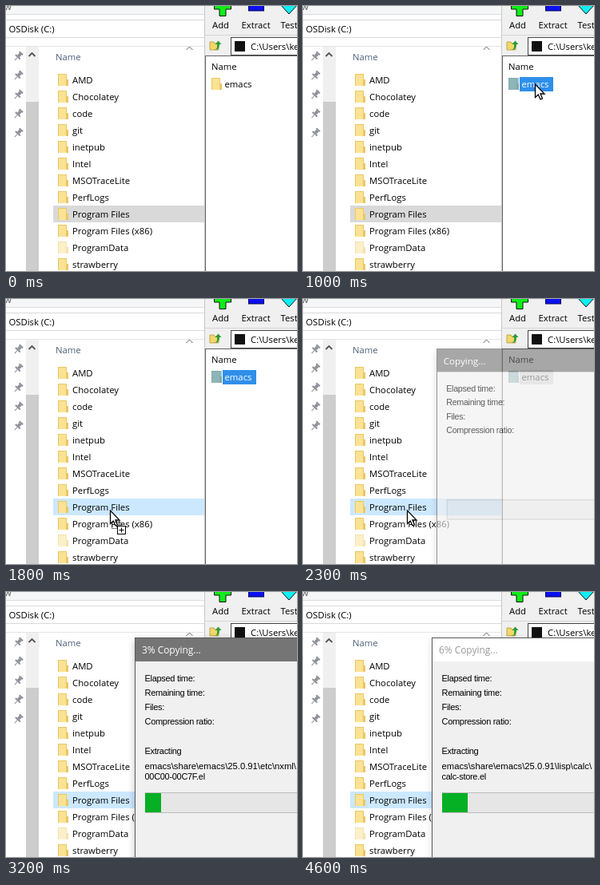
Recreate the animation shown at these times as an HTML page. Size 364 px wide and 332 px high, loop 4.7 s.

```html
<!DOCTYPE html>
<html lang="en">
<head>
<meta charset="utf-8">
<title>Drag and drop extraction</title>
<style>
html, body { margin: 0; width: 364px; height: 332px; overflow: hidden; background: #fff; }
svg { display: block; }
text { font: 11.3px "Open Sans", sans-serif; fill: #000; white-space: pre; }
.title { font-size: 11.9px; }
.label { font: 11px "Liberation Sans", Arial, sans-serif; letter-spacing: -.3px; }
.path { font: 11.25px "Liberation Sans", Arial, sans-serif; }
</style>
</head>
<body>
<svg id="stage" width="364" height="332" viewBox="0 0 364 332"></svg>
<script>
const LOOP = 4700, STEP = 100, ROW = 21.05, DROP_ROW = 8;
const folders = ['AMD', 'Chocolatey', 'code', 'git', 'inetpub', 'Intel', 'MSOTraceLite',
  'PerfLogs', 'Program Files', 'Program Files (x86)', 'ProgramData', 'strawberry'];

const rowY = i => Math.round(92.5 + ROW * i);
const rect = (x, y, w, h, fill, more = '') =>
  `<rect x="${x}" y="${y}" width="${w}" height="${h}" fill="${fill}" ${more}/>`;
const text = (x, y, s, more = '') => `<text x="${x}" y="${y}" ${more}>${s}</text>`;
const path = (d, fill, more = '') => `<path d="${d}" fill="${fill}" ${more}/>`;
const folder = (x, y, more = '') => `<g transform="translate(${x} ${y})" ${more}>
  ${path('M0-8h11v7h2v8H0z', '#eac765')}${rect(1, -7, 9, 14, '#fbe294')}</g>`;
const pin = y => `<g transform="translate(15.5 ${y}) rotate(42)" fill="#8b9097">
  ${rect(-3, -6, 6, 2, '#8b9097')}${rect(-2, -4, 4, 4, '#8b9097')}
  ${rect(-4, 0, 8, 2, '#8b9097')}${rect(-.5, 2, 1, 5, '#8b9097')}</g>`;

const explorer = `
  ${rect(0, 0, 249, 10, '#f5f6f7')}${rect(0, 10, 249, 1, '#dcdddf')}
  ${text(-2, 5, 'w', 'style="fill:#555"')}
  ${rect(-2, 17.5, 260, 22, '#fff', 'stroke="#d9d9d9"')}
  ${rect(0, 50, 249, 1, '#e5e5e5')}
  ${text(3.5, 33, 'OSDisk (C:)')}
  ${[63, 87, 111, 135, 159].map(pin).join('')}
  ${rect(25, 51, 16, 69, '#f0f0f0')}${rect(25, 120, 16, 212, '#cdcdcd')}
  ${path('M28.5 63l4-4 4 4', 'none', 'stroke="#555" stroke-width="1.8"')}
  ${text(62, 68, 'Name', 'style="fill:#4c607a"')}
  ${path('M225.500 55l4-4 4 4', 'none', 'stroke="#666"')}
  ${rect(59, 250, 190, 21, '#d9d9d9', 'id="selected"')}
  ${rect(59, 0, 190, 21, '#cce8ff', 'id="hover"')}
  ${folders.map((name, i) =>
    folder(65, rowY(i), name === 'ProgramData' ? 'opacity=".5"' : '') +
    text(83, rowY(i) + 4, name)).join('')}`;

const archive = `
  ${rect(249, 0, 115, 332, '#fff')}${rect(249, 0, 115, 63, '#f0f0f0')}
  ${rect(249, 36, 115, 1, '#d5d5d5')}
  ${path('M260.500-2h21V4h-6.500V12.500h-8V4h-6.500z', '#10ee18', 'stroke="#111"')}
  ${rect(303.5, -2, 19, 8, '#0b10f0', 'stroke="#05055c"')}
  ${path('M343-2L354 10L365-2z', '#10eef4', 'stroke="#111"')}
  ${text(258, 27.5, 'Add')}${text(294.5, 27.5, 'Extract')}${text(343.5, 27.5, 'Test')}
  ${path('M255 45h5l1 2h5v8H255z', '#f4d768', 'stroke="#a98c2c" stroke-width=".7"')}
  ${path('M260 55q5 0 4-7h-2.500l4-4.500 4 4.500H267q0 8-7 7z', '#2e9d36')}
  ${rect(281.5, 39.5, 90, 22, '#fff', 'stroke="#444"')}
  ${rect(286, 44, 13, 13, '#111')}
  ${text(306, 54.500, 'C:\\Users\\ke')}
  ${rect(249, 62, 115, 1, '#646464')}${rect(249, 62, 1, 270, '#646464')}
  ${rect(248, 0, 1, 332, '#c8c8c8')}
  ${text(257, 80, 'Name')}
  ${folder(257, 98)}
  ${rect(257, 90, 13, 15, '#3390d8', 'id="tint" opacity=".55"')}
  ${rect(271, 89, 42, 18, '#2f8fea', 'id="pick"')}
  ${text(273.5, 102, 'emacs', 'id="item"')}`;

const labels = [['Elapsed time:', 112], ['Remaining time:', 130], ['Files:', 148],
  ['Compression ratio:', 166], ['Extracting', 203, 'id="extracting"']];
const dialog = `<g id="dialog">
  <g id="shadow" filter="url(#blur)">${rect(161, 60, 300, 300, '#000')}</g>
  ${rect(161, 57, 210, 280, '#5a5a5a')}
  ${rect(162, 58, 210, 29, '#757575', 'id="bar"')}
  ${rect(162, 87, 210, 250, '#f0f0f0')}
  ${text(170, 77, '', 'id="title" class="title"')}
  ${labels.map(([s, y, more = '']) => text(173.5, y, s, `class="label" ${more}`)).join('')}
  ${text(173.5, 222, '', 'id="dir" class="path"')}
  ${text(173.5, 235, '', 'id="file" class="label"')}
  ${rect(174.5, 251.5, 200, 25, '#e6e6e6', 'stroke="#bcbcbc"')}
  ${rect(174, 252, 0, 24, '#06b025', 'id="fill"')}
</g>`;

const pointer = `<g id="cursor">
  ${path('M.5 0V16.500L4.300 13L7 19L9.500 18L7 12H12z', '#fff',
    'stroke="#000" stroke-width="1.3"')}
  <g id="copy">
    ${rect(2.5, 14.5, 11, 8, 'none', 'stroke="#000" stroke-dasharray="1 1"')}
    ${rect(9.5, 19.5, 10, 10, '#fff', 'stroke="#000"')}
    ${path('M14.500 21.500v6M11.500 24.500h6', 'none', 'stroke="#000"')}
  </g></g>`;

stage.innerHTML = `<defs><filter id="blur" x="-20%" y="-20%" width="140%" height="140%">
  <feGaussianBlur stdDeviation="5"/></filter></defs>` + explorer + archive + dialog + pointer;
const el = id => document.getElementById(id);
const set = (id, attrs) => {
  for (const name in attrs) el(id).setAttribute(name, attrs[name]);
};
const show = (id, on) => { el(id).style.display = on ? '' : 'none'; };

// Time followed by one or more values, joined linearly.
const route = [[300, 368, 214], [500, 316, 156], [600, 306, 130], [700, 297, 108], [800, 291, 98],
  [1000, 290, 98], [1200, 283, 108], [1300, 235, 165], [1400, 175, 226], [1600, 136, 262],
  [1800, 130, 265], [2400, 130, 265], [3000, 240, 340]];
const progress = [[2500, 0], [3200, 20], [4000, 32]];
const files = [[2600, 'etc\\charsets\\', 'JISX2131.map'], [2900, 'etc\\images\\', 'attach.xpm'],
  [3200, 'etc\\nxml\\', '00C00-00C7F.el'], [3500, 'lisp\\emacs-lisp\\', 'bytecomp.el'],
  [3800, 'lisp\\progmodes\\', 'cc-mode.el'], [4000, 'lisp\\textmodes\\', 'bibtex.el'],
  [4300, 'lisp\\calendar\\', 'diary-lib.el'], [4500, 'lisp\\calc\\', 'calc-store.el']];

function along(keys, t) {
  const i = keys.findIndex(k => k[0] > t);
  if (i < 0) return keys[keys.length - 1].slice(1);
  if (!i) return keys[0].slice(1);
  const a = keys[i - 1], b = keys[i], p = (t - a[0]) / (b[0] - a[0]);
  return a.slice(1).map((v, j) => v + (b[j + 1] - v) * p);
}

function drawDialog(t) {
  show('dialog', t >= 2300);
  const grow = Math.min(1, .975 + Math.max(0, t - 2300) * .000125);
  const inactive = t >= 4500;
  set('dialog', {
    opacity: t < 2400 ? .63 : t < 2500 ? .9 : 1,
    transform: `translate(401 260) scale(${grow}) translate(-401 -260)`
  });
  set('shadow', { opacity: inactive ? .15 : .25 });
  set('bar', { fill: inactive ? '#fff' : '#757575' });
  el('title').style.fill = inactive ? '#999' : '#fff';
  const percent = t < 2600 ? '' : t < 2900 ? '0% ' : t < 4300 ? '3% ' : '6% ';
  el('title').textContent = percent + 'Copying...';
  const current = files.filter(f => f[0] <= t).pop();
  show('extracting', current);
  el('dir').textContent = current ? 'emacs\\share\\emacs\\25.0.91\\' + current[1] : '';
  el('file').textContent = current ? current[2] : '';
  set('fill', { width: along(progress, t)[0] });
}

function draw(t) {
  const [x, y] = along(route, t);
  const dragging = t >= 1200 && t < 2000, dropped = t >= 2000;
  show('cursor', t >= 300 && t < 3000);
  set('cursor', { transform: `translate(${x} ${y})` });
  show('copy', dragging);

  const over = dropped ? DROP_ROW : Math.floor((y - rowY(0)) / ROW + .5);
  show('hover', dropped || dragging && x < 248);
  set('hover', { y: rowY(over) - 11 });
  show('selected', !dropped);

  const picked = t >= 900;
  show('pick', picked);
  show('tint', picked);
  set('pick', { fill: t < 2300 ? '#2f8fea' : '#d9d9d9' });
  el('item').style.fill = picked && t < 2300 ? '#fff' : '#000';
  drawDialog(t);
}

function tick() {
  draw(Math.floor(performance.now() % LOOP / STEP) * STEP);
  requestAnimationFrame(tick);
}
tick();
</script>
</body>
</html>
```
